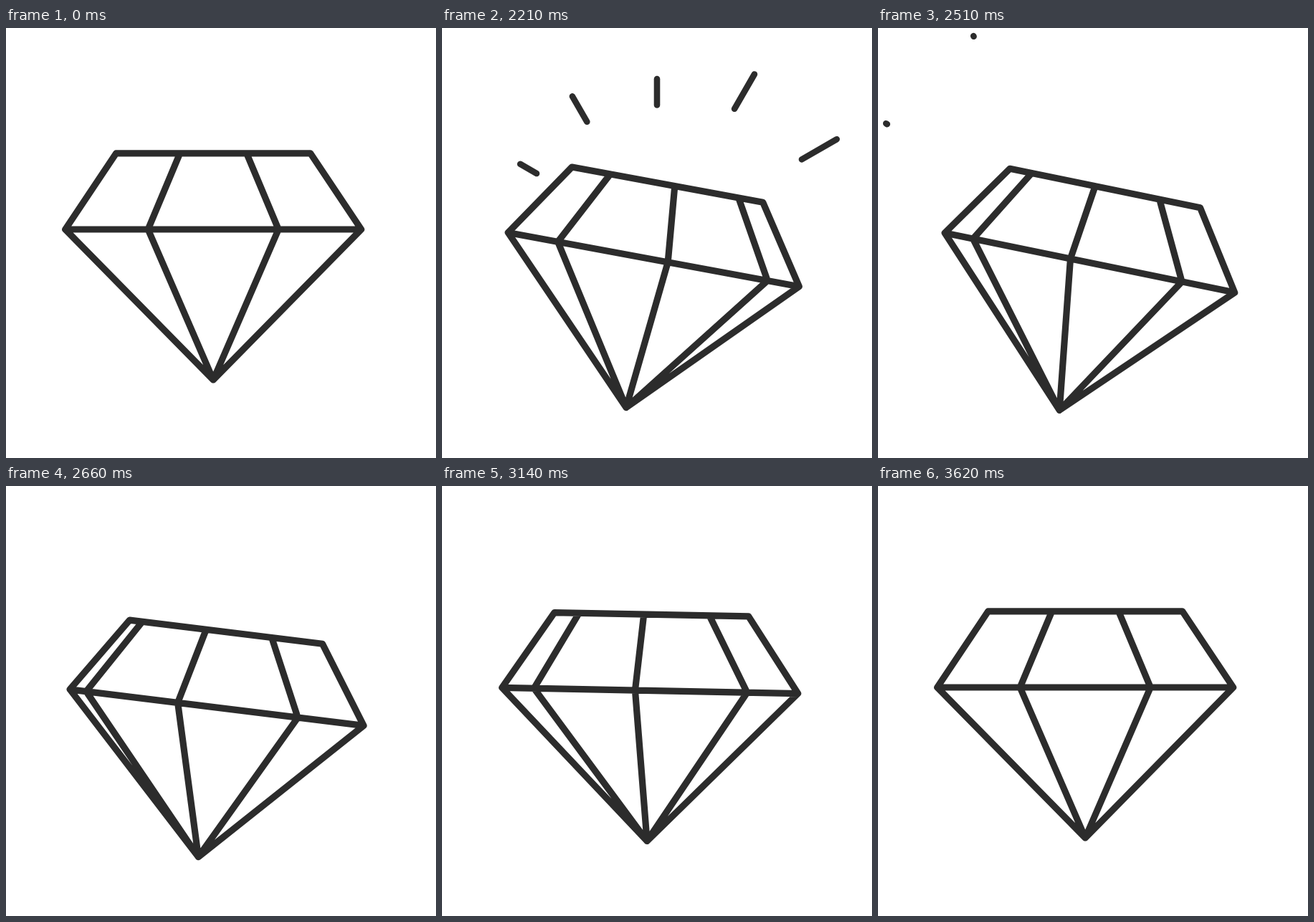
Animation, 600 px wide and 600 px high, one loop 3.65 s. Source, as an HTML page with a canvas:

```html
<!DOCTYPE html>
<html lang="en">
<head>
<meta charset="utf-8">
<title>Diamond</title>
<style>
html, body { margin: 0; width: 100%; height: 100%; overflow: hidden; background: #fff; }
canvas { display: block; width: 600px; height: 600px; }
</style>
</head>
<body>
<canvas id="stage" width="600" height="600"></canvas>
<script>
const ctx = document.getElementById('stage').getContext('2d');
const LOOP = 3650, REST = 2000, STEP = 30, STEPS = 54;
const INK = '#2c2c2c', DIAMOND_WIDTH = 9.2, RAY_WIDTH = 8.6;

// Diamond geometry at rest; offsets are measured from its vertical axis.
const AXIS = 289.2, TOP = 174.8, GIRDLE = 281, TIP = 491;
const TOP_NODES = [-135.5, -46.5, 46.5, 135.5];
const GIRDLE_NODES = [-206.5, -91, 91, 206.5];
const PIVOT = { x: 63, y: 335 };
const TILT = 15 * Math.PI / 180, PEAK = 11, FACET_TURNS = 6;

// Rays leave the stage centre one after another, from right to left.
const RAYS = [
  { angle: 30, start: 194, end: 333.5 },
  { angle: 60, start: 194, end: 333.5 },
  { angle: 90, start: 186, end: 286 },
  { angle: 120, start: 194, end: 333.5 },
  { angle: 150, start: 194, end: 333.5 }
];
const RAY_LIFE = 14;

const clamp = v => Math.max(0, Math.min(1, v));
const smooth = v => { const u = clamp(v); return u * u * (3 - 2 * u); };

// Cubic bezier easing with flat ends: (x1, 0, x2, 1).
function ease(u, x1, x2) {
  if (u <= 0) return 0;
  if (u >= 1) return 1;
  let lo = 0, hi = 1;
  for (let i = 0; i < 30; i++) {
    const s = (lo + hi) / 2, r = 1 - s;
    if (3 * r * r * s * x1 + 3 * r * s * s * x2 + s * s * s < u) lo = s;
    else hi = s;
  }
  return smooth(lo);
}

function tiltAt(k) {
  return TILT * (k < PEAK
    ? ease(k / PEAK, 0.333, 0.667)
    : 1 - ease((k - PEAK) / (STEPS - PEAK), 0.2, 0.11));
}

function line(...points) {
  points.forEach(([x, y], i) => i ? ctx.lineTo(x, y) : ctx.moveTo(x, y));
}

function drawDiamond(k) {
  const left = FACET_TURNS * (1 - ease(k / STEPS, 0.335, 0.239));
  const shift = left - Math.floor(left);
  const at = (nodes, i) => AXIS + nodes[i] + (nodes[i + 1] - nodes[i]) * shift;
  const edge = (nodes, i) => AXIS + nodes[i];

  ctx.save();
  ctx.translate(PIVOT.x, PIVOT.y);
  ctx.rotate(tiltAt(k));
  ctx.translate(-PIVOT.x, -PIVOT.y);
  ctx.lineWidth = DIAMOND_WIDTH;
  ctx.beginPath();
  line([edge(TOP_NODES, 0), TOP], [edge(TOP_NODES, 3), TOP],
    [edge(GIRDLE_NODES, 3), GIRDLE], [AXIS, TIP], [edge(GIRDLE_NODES, 0), GIRDLE]);
  ctx.closePath();
  line([edge(GIRDLE_NODES, 0), GIRDLE], [edge(GIRDLE_NODES, 3), GIRDLE]);
  for (let i = 0; i < 3; i++) {
    line([at(TOP_NODES, i), TOP], [at(GIRDLE_NODES, i), GIRDLE], [AXIS, TIP]);
  }
  ctx.stroke();
  ctx.restore();
}

function drawRays(k) {
  ctx.lineWidth = RAY_WIDTH;
  RAYS.forEach(({ angle, start, end }, i) => {
    const age = k - i;
    if (age <= 0 || age > RAY_LIFE) return;
    const head = smooth((age + 0.2) / 11.5);
    const tail = Math.min(0.995, smooth((age - 3.4) / 10.3));
    const a = angle * Math.PI / 180;
    const point = f => {
      const r = start + (end - start) * f;
      return [300 + r * Math.cos(a), 300 - r * Math.sin(a)];
    };
    ctx.beginPath();
    line(point(tail), point(head));
    ctx.stroke();
  });
}

function draw(time) {
  const k = Math.max(0, Math.min(STEPS, Math.floor((time % LOOP - REST) / STEP)));
  ctx.fillStyle = '#fff';
  ctx.fillRect(0, 0, 600, 600);
  ctx.strokeStyle = INK;
  ctx.lineCap = ctx.lineJoin = 'round';
  drawDiamond(k);
  drawRays(k);
}

const begin = performance.now();
function tick() {
  draw(performance.now() - begin);
  requestAnimationFrame(tick);
}
tick();
</script>
</body>
</html>
```
